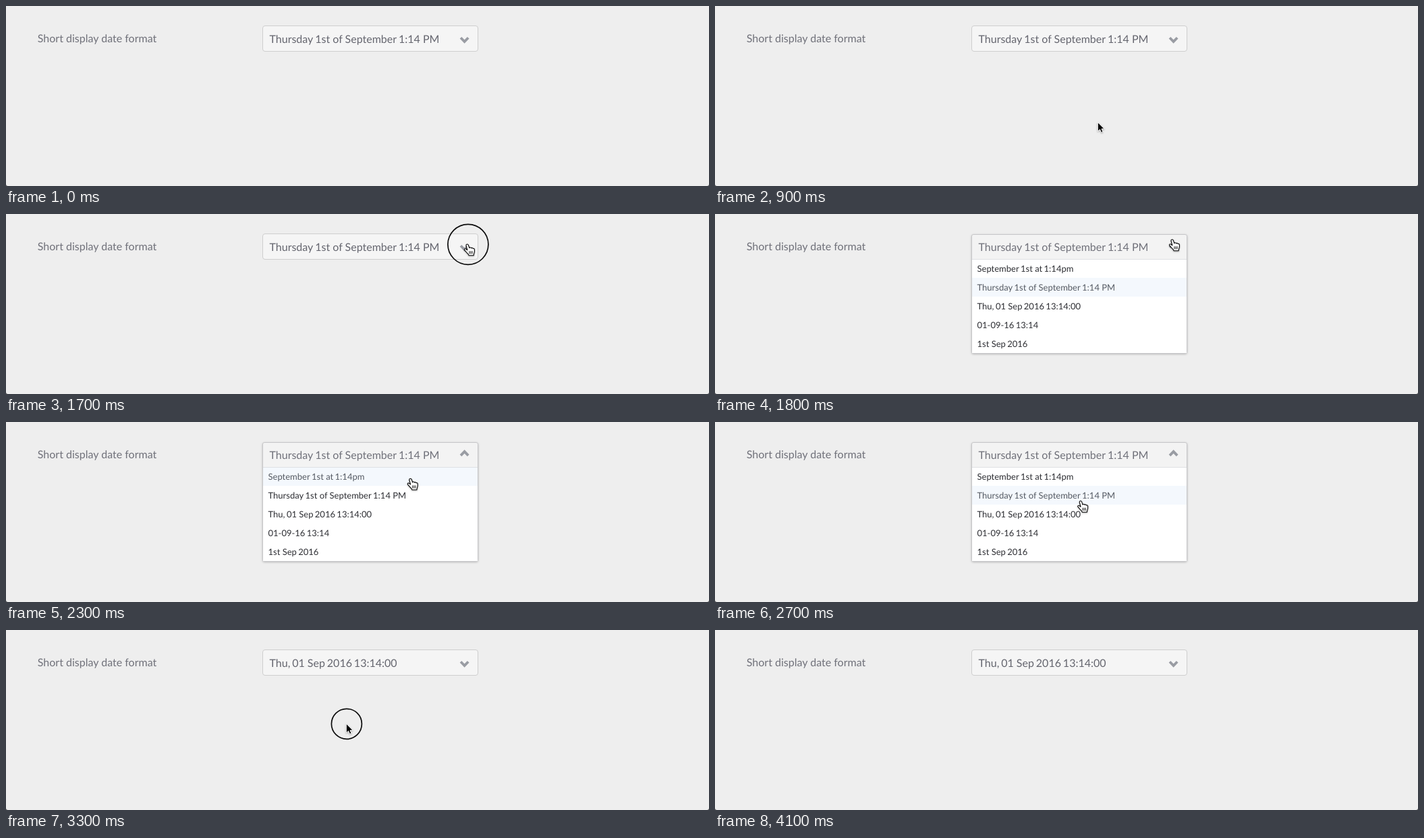
Animation of 1042x268 px, one loop 4.2 s. Source, as an HTML page:

```html
<!DOCTYPE html>
<html lang="en">
<head>
<meta charset="utf-8">
<title>Date format picker</title>
<style>
  html, body { margin: 0; width: 100%; height: 100%; overflow: hidden; background: #4a4a4c; }
  svg { display: block; width: 1042px; height: 268px; font-family: Lato, sans-serif; text-rendering: geometricPrecision; }
  .big { font-size: 16px; fill: #65666f; }
  .big.soft { fill: #70717a; }
  .gap { word-spacing: -.075em; }
  .row text { font-size: 13px; fill: #2d2e33; }
  .row rect { fill: #fff; }
  .row.on text { fill: #555a63; }
  .row.on rect { fill: #f4f8fd; }
  .chevron { fill: none; stroke: #999ca3; stroke-width: 3.8; }
  #list { filter: drop-shadow(0 1px 1.5px rgba(0, 0, 0, .22)); }
  #cursor { filter: drop-shadow(0 1px 1px rgba(0, 0, 0, .3)); }
</style>
</head>
<body>
<svg viewBox="0 0 1042 268">
  <rect y="-4" width="1042" height="272" rx="3" fill="#eee"/>
  <text class="big soft" x="46.8" y="54">Short display date format</text>

  <g id="closed">
    <rect x="380.5" y="29.5" width="319" height="38" rx="3.5" fill="#f5f5f5" stroke="#cecece"/>
    <path class="chevron" d="M674 47.2l5.6 5.8 5.6-5.8"/>
  </g>

  <g id="open">
    <g id="list">
      <rect x="380.5" y="30.5" width="319" height="177" rx="2.5" fill="#f3f3f3" stroke="#c6c6c8"/>
      <g id="rows"></g>
    </g>
    <path d="M381 67.5H699" stroke="#dfe1e4"/>
    <path class="chevron" d="M674 49.9l5.6-5.8 5.6 5.8"/>
  </g>

  <text class="big" id="value" x="390.5" y="55"></text>
  <circle id="ring" fill="none" stroke="#0c0c0c" stroke-width="1.7"/>

  <g id="cursor">
    <path id="arrow" fill="#000" stroke="#fff" stroke-linejoin="round"
      d="M.3 0V13.7L3.5 10.8 5.6 15.5 8 14.4 6 9.9H10.2Z"/>
    <g id="hand" stroke="#000" stroke-width="1.1" stroke-linejoin="round" stroke-linecap="round">
      <path fill="#fff" d="M-2 1.9C-2.2-.3.8-.6 1.4 1.3L2.8 5.6C3.4 4.4 5.3 4.6 5.7 5.9 6.5 5 8 5.4 8.3 6.6
        9.2 5.9 10.4 6.5 10.4 7.8V10.8C10.4 12.6 9.3 13.4 9.1 16.8H2.2C1.6 14.6-.6 13.4-2.2 11.2L-4.2 8.9
        C-5.3 7.4-3.6 6.1-2.3 7.1L-.2 8.7Z"/>
      <path fill="none" stroke-width=".9" d="M2.9 10.6V14M5 10.6V14M7.1 10.6V14"/>
    </g>
  </g>
</svg>

<script>
const LOOP = 4200, STEP = 100, TOP = 67, ROW = 28;
const options = [
  "September 1st at 1:14pm",
  "Thursday 1st of September 1:14 PM",
  "Thu, 01 Sep 2016 13:14:00",
  "01-09-16 13:14",
  "1st Sep 2016"
];
const before = 1, after = 2;
const enters = 900, opens = 1800, picks = 3300, leaves = 4100;
const ringSize = { 1700: 30, [picks]: 22.5 };

// The pointer starts at home, then glides: from ms, to ms, x, y
const home = [567, 173];
const glides = [
  [900, 1400, 672, 57],
  [1500, 1600, 684, 45],
  [1700, 1800, 678, 38],
  [1900, 2500, 590, 90],
  [2500, 3100, 504, 139.5],
  [3800, 4000, 541, 245]
];

const $ = id => document.getElementById(id);
const show = (id, on) => $(id).style.display = on ? "" : "none";
const easeOut = u => u * (2 - u);
const clamp = u => Math.min(1, Math.max(0, u));

// Spaces are kerned tighter in front of digits.
const kern = text => text.replace(/ (?=\d)/g, '<tspan class="gap"> </tspan>');

$("rows").innerHTML = options.map((text, i) => {
  const y = TOP + i * ROW;
  return `<g class="row"><rect x="381" y="${y}" width="318" height="${ROW}"/>` +
    `<text x="388.5" y="${y + 19}">${kern(text)}</text></g>`;
}).join("");
const rows = [...$("rows").children];

function pointerAt(t) {
  let [x, y] = home;
  for (const [from, to, toX, toY] of glides) {
    const k = easeOut(clamp((t - from) / (to - from)));
    x += (toX - x) * k;
    y += (toY - y) * k;
  }
  return [x, y];
}

// The current choice stays lit until the pointer enters the list.
const litAt = y => y < TOP ? before : Math.floor((y - TOP) / ROW);

function draw(now) {
  const t = Math.floor(now % LOOP / STEP) * STEP;
  const open = t >= opens && t < picks;
  const [x, y] = pointerAt(t);
  const overField = x > 380 && x < 700 && y > 29 && y < 68;
  const pointing = open || overField;

  show("open", open);
  show("closed", !open);
  $("value").innerHTML = kern(options[t < picks ? before : after]);
  $("value").classList.toggle("soft", open);
  rows.forEach((row, i) => row.classList.toggle("on", i === litAt(y)));

  show("cursor", t >= enters && t < leaves);
  show("hand", pointing);
  show("arrow", !pointing);
  $("cursor").setAttribute("transform", `translate(${x} ${y})`);

  const r = ringSize[t];
  show("ring", r);
  if (r) {
    $("ring").setAttribute("r", r);
    $("ring").setAttribute("transform", `translate(${x + .9} ${y + .3})`);
  }
}

const start = performance.now();
function tick() {
  draw(performance.now() - start);
  requestAnimationFrame(tick);
}
tick();
</script>
</body>
</html>
```
